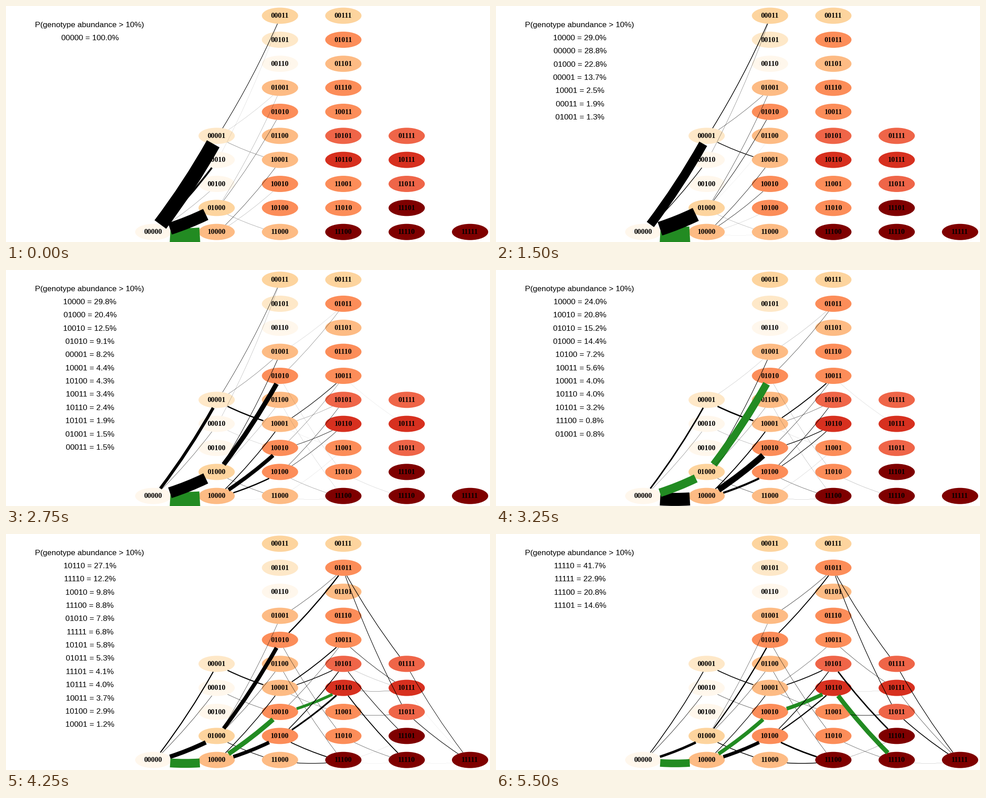
These frames come from a looping animation (1068x524 px, 5750 ms). A matplotlib script:

```python
import itertools
import math

import matplotlib.pyplot as plt
import numpy as np
from matplotlib.animation import FuncAnimation
from matplotlib.patches import Ellipse, PathPatch
from matplotlib.path import Path

W, H, DPI = 1068, 524, 100
FRAMES, INTERVAL = 23, 250
PX = 72 / DPI  # points per pixel
KEYS = [0, 4, 8, 13, 15, 19, 22]
GREEN = "#228B22"
RX, RY = 40, 18

PALETTE = ["#FFF7EC", "#FEE8C8", "#FDD49E", "#FDBB84", "#FC8D59",
           "#EF6548", "#D7301F", "#B30000", "#7F0000"]
SHADES = ["0", "10023", "2103433443", "2434456448", "56588", "8"]

# Line widths in pixels: tail -> head -> (first key index, widths...)
ROOT_LINKS = {
    "00000": {
        "10000": (0, 32.5, 35, 40, 29, 22.5, 17, 17),
        "00001": (0, 32, 27.5, 12, 3.2, 2.6, 2, 1.7),
        "00010": (0, 4, 2, .8, .35, .6, .8, .8),
        "00100": (0, .3, 0),
        "01000": (0, 27, 29.5, 33.5, 19, 12.5, 7, 5.5),
    },
}
SINGLE_LINKS = {
    "00001": {
        "00011": (0, 1.1, 1.2, 1.8, 0),
        "01001": (0, .15, .25, .8, .15, 0),
        "10001": (0, .4, .7, 2.3, 3, 2.4, 2.2, 1.8),
    },
    "00010": {
        "00011": (0, .1, .25, .5, 0),
        "10010": (3, .25, .45, .65, .6),
    },
    "01000": {
        "01001": (0, .25, .4, .8, 1.1, .5, .6, .5),
        "01010": (0, .5, .4, 1.5, 16.5, 13, 4.5, 2.6),
        "01100": (2, .1, .35, .55, .7, .6),
        "11000": (0, .3, .15, .3, .6, .8, 1.6, 1.6),
    },
    "10000": {
        "10001": (0, .6, .6, 1, 2, 1.8, 1.3, 1.3),
        "10010": (0, .2, .4, 1.1, 13.5, 13, 8, 8.5),
        "10100": (2, .25, 4.5, 8, 8, 7.5),
        "11000": (2, .1, 0),
    },
}
DOUBLE_LINKS = {
    "01001": {"01011": (3, .2, .5, .7, .7)},
    "01010": {"01011": (3, .6, 2, 3.2, 2), "11010": (3, .2, .5, .6, .6)},
    "01100": {"11100": (3, .2, .5, .6, .6)},
    "10001": {
        "10011": (3, 2, 2.8, 1.2, .5),
        "10101": (3, .5, 1.1, 2, 1.9),
        "11001": (3, .1, .2, .6, .5),
    },
    "10010": {"10011": (3, .6, 1.1, 0), "10110": (3, 1.4, 4.5, 8, 8.5)},
    "10100": {
        "10101": (3, 1, 2.2, 1, 1.5),
        "10110": (3, 1.2, 3.2, 4, 2.5),
        "11100": (3, .5, 1.1, 2.8, 3.2),
    },
    "11000": {"11001": (3, .12, 0), "11100": (3, .15, .8, 1.8, 1.6)},
}
LATE_LINKS = {
    "01011": {"01111": (4, .6, 2, 1.3), "11011": (4, .5, 1.8, 1.3)},
    "10011": {"10111": (3, .1, .5, 1.2, .6)},
    "10101": {"10111": (4, .15, .25, 0), "11101": (4, .1, 2.2, 3)},
    "10110": {"10111": (4, .3, .5, .12), "11110": (4, .1, 3.8, 10)},
    "11001": {"11011": (4, .25, .8, .9)},
    "11010": {"11110": (3, .2, .5, .5, .5)},
    "11100": {"11101": (5, .15, .3), "11110": (5, .1, 0)},
    "01111": {"11111": (4, .12, 1.8, 1.3)},
    "10111": {"11111": (5, .1, .6)},
    "11011": {"11111": (4, .5, 1.8, 1.7)},
    "11110": {"11111": (5, .1, .15)},
}

# Genotype shares in percent at each moment; ties keep the order of first use.
SHARE_KEYS = [3] + KEYS[1:]
SHARES = [
    {"00000": 100},
    {"00000": 57.5, "10000": 19.5, "01000": 16.1, "00001": 6.9},
    {"10000": 38.5, "01000": 29.5, "00001": 20.5, "10001": 5.1,
     "00011": 3.8, "01001": 2.6},
    {"10000": 24, "10010": 20.8, "01010": 15.2, "01000": 14.4, "10100": 7.2,
     "10011": 5.6, "10001": 4, "10110": 4, "10101": 3.2, "11100": .8,
     "01001": .8},
    {"10110": 21.3, "10010": 19.7, "01010": 15.6, "01011": 10.7,
     "10101": 8.2, "10011": 7.4, "11100": 5.7, "10100": 5.7, "10001": 2.5,
     "01111": .8, "11111": .8, "11110": .8, "10111": .8},
    {"10110": 32.9, "11110": 23.5, "11111": 12.9, "11100": 11.8,
     "11101": 8.2, "10111": 7.1, "10101": 3.5},
    {"11110": 41.7, "11111": 22.9, "11100": 20.8, "11101": 14.6},
]
TIE_ORDER = ["11100"] + [g for share in SHARES for g in share]
GENOTYPES = list(dict.fromkeys(TIE_ORDER))

# Highlighted route and the step at which it takes over
ROUTES = [
    (0, ["00000", "10000"]),
    (13, ["00000", "01000", "01010"]),
    (17, ["00000", "10000", "10010", "10110"]),
    (21, ["00000", "10000", "10010", "10110", "11110"]),
]

fig = plt.figure(figsize=(W / DPI, H / DPI), dpi=DPI, facecolor="white")
ax = fig.add_axes([0, 0, 1, 1])
ax.set(xlim=(0, W), ylim=(H, 0))
ax.axis("off")


def label(x, baseline, text, size, **style):
    return ax.text(x, baseline, text, fontsize=size * PX, ha="center",
                   va="baseline", color="black", **style)


def place_nodes():
    places = {}
    bits = ["".join(b) for b in itertools.product("01", repeat=5)]
    for rank, shades in enumerate(SHADES):
        names = [b for b in bits if b.count("1") == rank]
        for row, (name, shade) in enumerate(zip(names, shades)):
            x = 325 + 139.8 * rank
            y = 501.7 - 53.35 * (len(names) - 1 - row)
            places[name] = x, y
            ax.add_patch(Ellipse((x, y), 2 * RX, 2 * RY, lw=0, zorder=1,
                                 fc=PALETTE[int(shade)]))
            label(x - .3, y + 4.8, name, 16, family="Liberation Serif",
                  weight="bold", zorder=2)
    return places


def on_rim(center, angle):
    r = 1 / math.hypot(math.cos(angle) / RX, math.sin(angle) / RY)
    return np.array(center) + r * np.array([math.cos(angle), math.sin(angle)])


def curve(tail, head):
    """Bowed link that meets both ellipses 10 degrees off the chord."""
    angle = math.atan2(head[1] - tail[1], head[0] - tail[0])
    tilt = math.radians(10)
    start = on_rim(tail, angle + tilt)
    end = on_rim(head, angle + math.pi - tilt)
    sag = 0.017 * math.dist(start, end)
    normal = np.array([-math.sin(angle), math.cos(angle)])
    control = (start + end) / 2 + 2 * sag * normal
    return Path([start, control, end], [Path.MOVETO, Path.CURVE3, Path.CURVE3])


def place_links(places):
    links = {}
    for group in (ROOT_LINKS, SINGLE_LINKS, DOUBLE_LINKS, LATE_LINKS):
        for tail, heads in group.items():
            for head, (first, *widths) in heads.items():
                pad = len(KEYS) - first - len(widths)
                patch = PathPatch(curve(places[tail], places[head]), fc="none",
                                  capstyle="butt", zorder=3 + len(links) / 100)
                ax.add_patch(patch)
                links[tail, head] = patch, [0] * first + widths + [0] * pad
    return links


links = place_links(place_nodes())
label(184.5, 46.5, "P(genotype abundance > 10%)", 17.4,
      family="Liberation Sans")
rows = [label(185.3, 76 + 29.35 * i, "", 17.4, family="Liberation Sans")
        for i in range(len(GENOTYPES))]


def update(frame):
    route = [path for start, path in ROUTES if frame >= start][-1]
    lit = set(zip(route, route[1:]))
    for ends, (patch, widths) in links.items():
        width = np.interp(frame, KEYS, widths)
        patch.set_visible(width > 0.04)
        patch.set_linewidth(width * PX)
        patch.set_edgecolor(GREEN if ends in lit else "black")

    shares = [(g, np.interp(frame, SHARE_KEYS, [s.get(g, 0) for s in SHARES]))
              for g in GENOTYPES]
    shown = sorted((s for s in shares if s[1] > 0.5), key=lambda s: -s[1])
    lines = [f"{g} = {share:.1f}%" for g, share in shown]
    for row, text in itertools.zip_longest(rows, lines, fillvalue=""):
        row.set_text(text)
    return [patch for patch, _ in links.values()] + rows


animation = FuncAnimation(fig, update, frames=FRAMES, interval=INTERVAL,
                          repeat=True, repeat_delay=0, blit=False)
plt.show()
```
